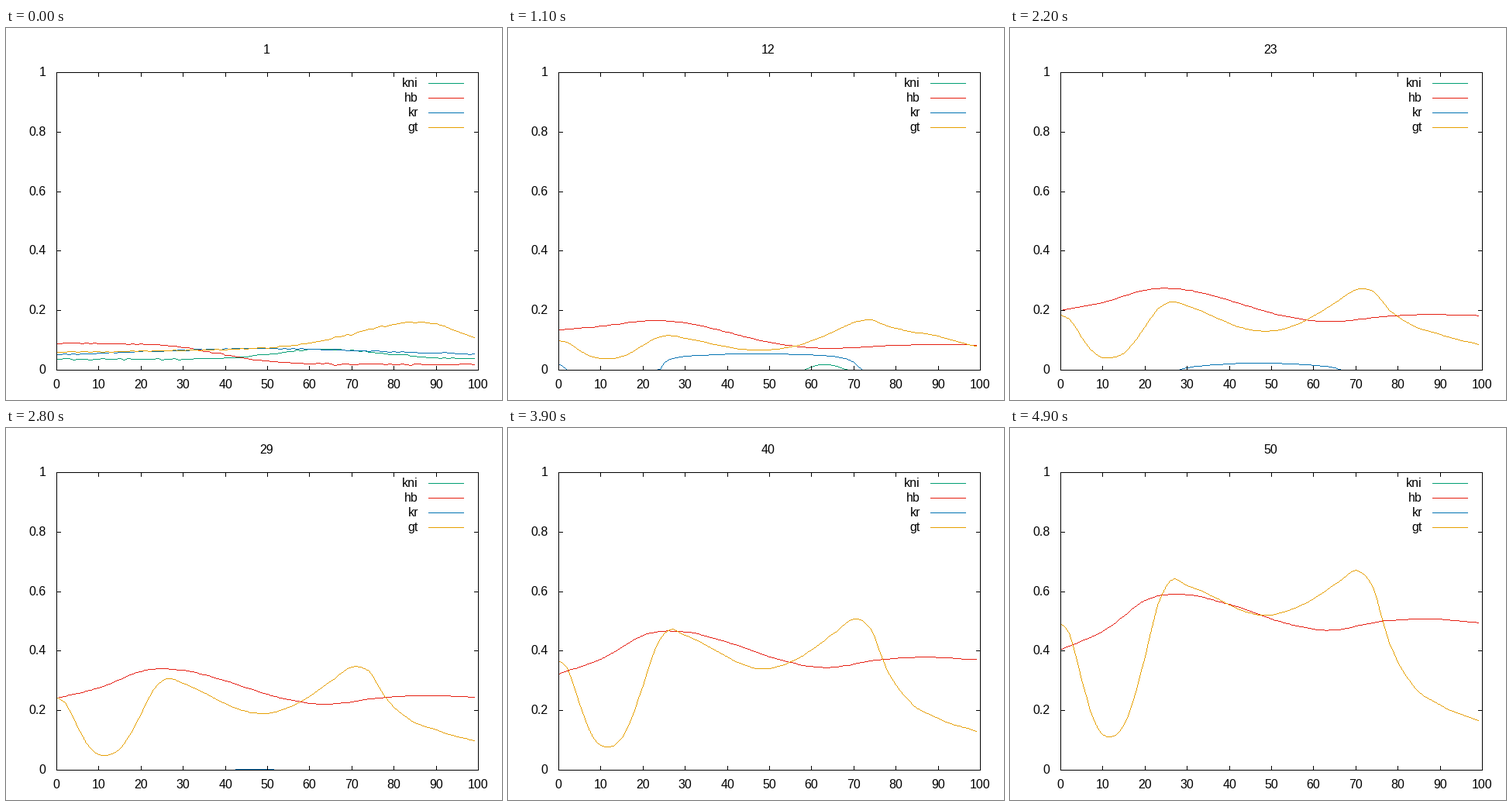
Recreate the animation shown at these times as a matplotlib script. Size 640 by 480 pixels, loop 5 s.

```python
import numpy as np
import matplotlib.pyplot as plt
from matplotlib.animation import FuncAnimation

plt.rcParams["font.family"] = "Liberation Sans"

FRAMES, INTERVAL = 50, 100
WIDTH, HEIGHT, DPI = 640, 480, 100
LEFT, RIGHT, TOP, BOTTOM = 65, 609, 57, 441
TICK = 5
X = np.arange(100)

BLACK = (0, 0, 0)
COLORS = {
    "kni": (0, 158, 115),
    "hb": (229, 30, 16),
    "kr": (0, 114, 178),
    "gt": (230, 159, 0),
}


def bump(center, left, right=None):
    """Bell of height 1 with its own width on each side."""
    width = np.where(X < center, left, right or left)
    return np.exp(-((X - center) / width) ** 2 / 2)


def through(*points):
    """Smooth curve through (position, level) points."""
    x, y = np.array(points, float).T
    slope = np.gradient(y, x)
    i = np.clip(np.searchsorted(x, X, side="right") - 1, 0, len(x) - 2)
    h = x[i + 1] - x[i]
    u = (X - x[i]) / h
    return ((1 + 2 * u) * (1 - u) ** 2 * y[i] + u * (1 - u) ** 2 * h * slope[i]
            + u * u * (3 - 2 * u) * y[i + 1] + u * u * (u - 1) * h * slope[i + 1])


HB_END = through((0, .404), (10, .467), (22, .582), (28, .591), (40, .557),
                 (52, .499), (63, .470), (76, .500), (87, .508), (99, .496))
GT_END = through((0, .493), (2, .461), (5, .302), (8, .161), (11, .113),
                 (16, .182), (20, .380), (23, .555), (26, .636), (30, .620),
                 (50, .522), (59, .568), (66, .633), (70.5, .670),
                 (74, .614), (78, .427), (83, .294), (90, .218), (99, .167))


def kni(u):
    start = .037 + .033 * bump(63, 11, 14)
    return start - (.98 - .5 * bump(63, 6)) * u ** 1.5


def hb(u):
    start = .019 + .071 / (1 + np.exp((X - 39) / 6.5))
    power = 1.33 - .12 * bump(24, 15) + .11 * bump(63, 10)
    return start + (HB_END - start) * u ** power


def kr(u):
    start = .048 + .024 * bump(47, 25, 30)
    gap = np.exp(np.minimum((X - 3.8) / 1.6, (22.5 - X) / 1.55))
    edge = np.exp((X - 73.5) / 2)
    return start - (.2 - .04 * bump(47, 12) + gap + edge) * u ** 1.5


def gt(u):
    start = .06 + .0002 * X + .085 * bump(86, 15, 9)
    power = 1.32 + .55 * bump(11, 3.5) + .6 * bump(49, 10) - .15 * bump(80, 12)
    fading = start * np.exp(-3 * u)
    return fading + (GT_END - start * np.exp(-3)) * u ** power


GENES = {"kni": kni, "hb": hb, "kr": kr, "gt": gt}


def px_x(value):
    return LEFT + (RIGHT - LEFT) * value / 100


def px_y(value):
    return BOTTOM - (BOTTOM - TOP) * value


def trace(canvas, xs, ys, color):
    """Draw a one-pixel polyline without smoothing."""
    xs, ys = np.rint(xs).astype(int), np.rint(ys).astype(int)
    for x0, y0, x1, y1 in zip(xs, ys, xs[1:], ys[1:]):
        n = max(abs(x1 - x0), abs(y1 - y0)) + 1
        rows = np.rint(np.linspace(y0, y1, n)).astype(int)
        cols = np.rint(np.linspace(x0, x1, n)).astype(int)
        canvas[rows, cols] = color


def draw_axes(canvas):
    trace(canvas, [LEFT, RIGHT, RIGHT, LEFT, LEFT],
          [TOP, TOP, BOTTOM, BOTTOM, TOP], BLACK)
    for value in range(0, 101, 10):
        x = px_x(value)
        trace(canvas, [x, x], [TOP, TOP + TICK], BLACK)
        trace(canvas, [x, x], [BOTTOM - TICK, BOTTOM], BLACK)
    for k in range(6):
        y = px_y(k / 5)
        trace(canvas, [LEFT, LEFT + TICK], [y, y], BLACK)
        trace(canvas, [RIGHT - TICK, RIGHT], [y, y], BLACK)


fig = plt.figure(figsize=(WIDTH / DPI, HEIGHT / DPI), dpi=DPI)
ax = fig.add_axes([0, 0, 1, 1])
ax.axis("off")
blank = np.full((HEIGHT, WIDTH, 3), 255, np.uint8)
picture = ax.imshow(blank, extent=(0, WIDTH, HEIGHT, 0), aspect="auto",
                    interpolation="nearest")


def label(x, y, text, align="center"):
    return ax.text(x, y, text, fontsize=16 * 72 / DPI, ha=align, va="baseline")


for value in range(0, 101, 10):
    label(round(px_x(value)) + .25, 465, str(value))
for k in range(6):
    label(51.5, round(px_y(k / 5)) + 5, f"{k / 5:g}", "right")
for row, name in enumerate(GENES):
    y = 71 + 19 * row
    label(532, y + 5, name, "right")
    trace(blank, [545, 590], [y, y], COLORS[name])
title = label(335.75, 33, "1")

noise = np.random.default_rng(4).normal(0, .0012, (len(GENES), len(X)))


def update(frame):
    canvas = blank.copy()
    for level, jitter, name in zip(GENES.values(), noise, GENES):
        values = level(frame / (FRAMES - 1)) + jitter * np.exp(-frame / 1.5)
        trace(canvas, px_x(X), px_y(np.maximum(values, 0)), COLORS[name])
    draw_axes(canvas)
    picture.set_data(canvas)
    title.set_text(str(frame + 1))
    return picture, title


anim = FuncAnimation(fig, update, frames=FRAMES, interval=INTERVAL,
                     repeat=True, repeat_delay=0, blit=False)
plt.show()
```
